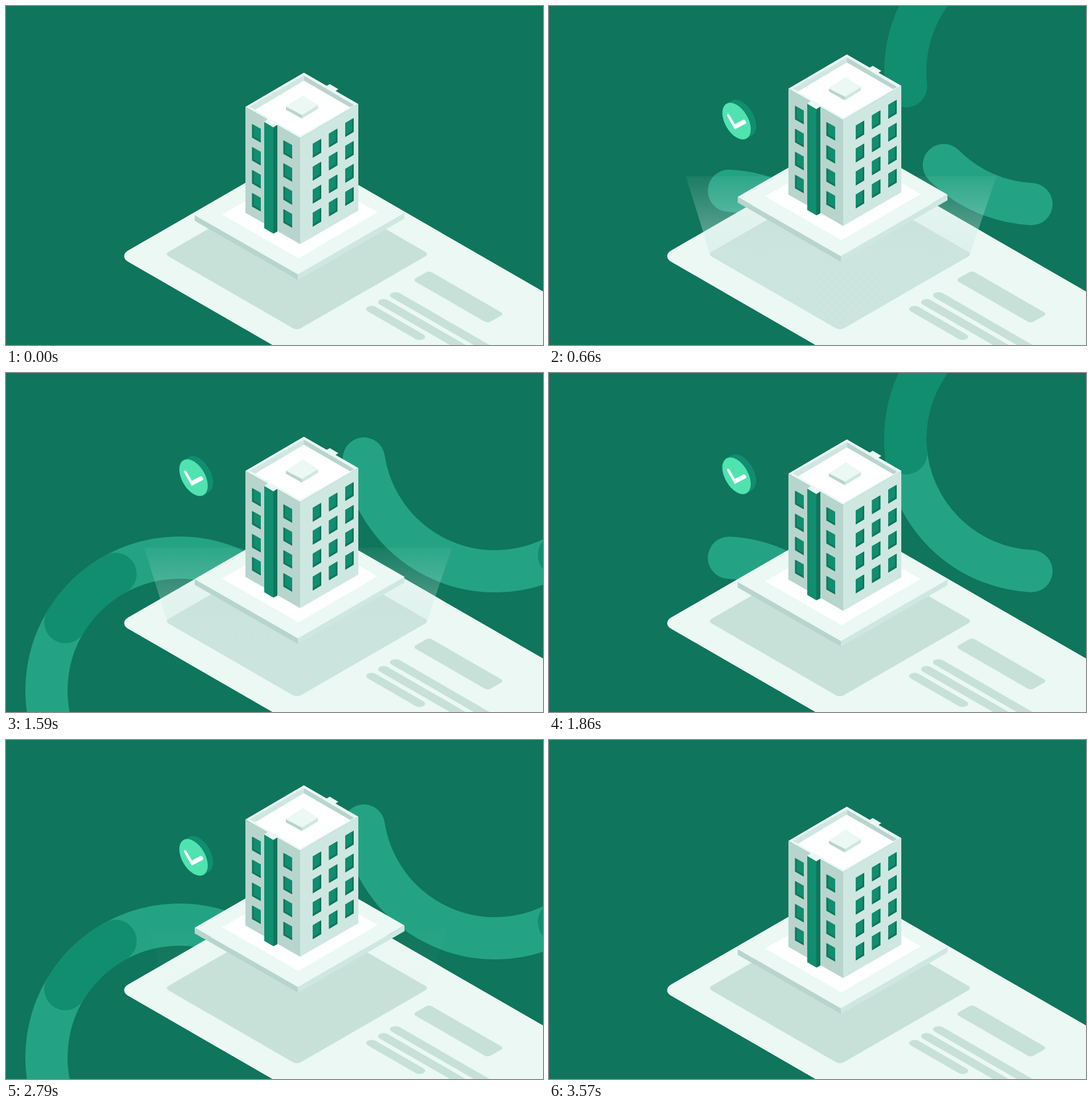
Write an HTML page that moves like this. It is 942 by 595 pixels and loops after 3600 ms.

```html
<!DOCTYPE html>
<html lang="en">
<head>
<meta charset="utf-8">
<title>Isometric building</title>
<style>
  html, body { margin: 0; width: 100%; height: 100%; overflow: hidden; background: #0f755c; }
  svg { display: block; width: 942px; height: 595px; }
  .pale { fill: #ebf8f4; }
  .mid { fill: #cfe7e1; }
  .shade { fill: #b8d5cd; }
  .rug { fill: #c7e1d9; }
  .white { fill: #fff; }
  .green { fill: #118d6f; }
  .dark { fill: #0f755c; }
  .ring { fill: none; stroke-width: 74; stroke-linecap: round; }
</style>
</head>
<body>
<svg viewBox="0 0 942 595">
  <defs>
    <linearGradient id="glow" gradientUnits="userSpaceOnUse" x1="0" x2="0" y1="267" y2="437">
      <stop offset="0" stop-color="#d0e9e3" stop-opacity=".08"/>
      <stop offset="1" stop-color="#d0e9e3" stop-opacity=".62"/>
    </linearGradient>
  </defs>

  <path id="lightRing" class="ring" stroke="#24a384"/>
  <path id="darkRing" class="ring" stroke="#118d6f"/>

  <!-- page, drawn in the ground plane -->
  <rect class="pale" width="900" height="368" rx="20" transform="matrix(.866 .5 -.866 .5 515.8 255)"/>
  <rect class="rug" width="268" height="268" rx="8" transform="matrix(.866 .5 -.866 .5 510.3 301.5)"/>
  <rect class="rug" width="152" height="33" rx="6" transform="matrix(.866 .5 -.866 .5 742 464.5)"/>
  <path d="M0 0H97M0-24.2H260M0-48.4H260" stroke="#c7e1d9" stroke-width="16" stroke-linecap="round"
        transform="matrix(.866 .5 -.866 .5 641.5 532)"/>

  <path id="beam" fill="url(#glow)"/>

  <g id="building">
    <path class="shade" d="M331 367L512 471V481L331 377Z"/>
    <path class="mid" d="M512 471L699 363V373L512 481Z"/>
    <path class="pale" d="M331 367L518 259 699 363 512 471Z"/>
    <path class="white" d="M379 366L518 286 652 362 513 443Z"/>
    <path class="pale" d="M561 141L568 137 583 146 575 151Z"/>
    <path class="shade" d="M420 177L516 232V418L420 363Z"/>
    <path class="mid" d="M516 232L618 172V359L516 418Z"/>
    <path class="pale" d="M522.5 117L618 172 516 232 420 177Z"/>
    <path class="white" d="M522.5 122L611 174 516 228 427 177Z"/>
    <path class="mid" d="M522.5 122L427 177 437 182 522.5 131Z"/>
    <path class="shade" d="M522.5 122L611 174 604 178 522.5 131Z"/>
    <path class="shade" d="M491 176.5L519 191V197.500L491 182Z"/>
    <path class="mid" d="M519 191L547 174V180.500L519 197.500Z"/>
    <path class="pale" d="M520.5 157L547 174 519 191 491 176.500Z"/>
    <path class="green" d="M453 203L469 212V399.500L453 390Z"/>
    <path class="dark" d="M469 212L476 208.500V396L469 399.500Z"/>
    <path class="pale" d="M453 203.500L460 198 476 208.500 469 213Z"/>
    <path id="frames" class="dark"/>
    <path id="panes" class="green"/>
  </g>

  <g id="badge">
    <path d="M0 0L11-11" stroke="#118d6f" stroke-width="57.6" stroke-linecap="round"/>
    <circle r="28.8" fill="#50e3b0"/>
    <path d="M-16.200-.9L-3.500 11.700 16.200-7.100" fill="none" stroke="#fff" stroke-width="6.500" stroke-linecap="round"/>
  </g>
</svg>
<script>
  const $ = id => document.getElementById(id);
  const clamp = (v, lo, hi) => Math.min(hi, Math.max(lo, v));
  const smooth = x => { x = clamp(x, 0, 1); return x * x * (3 - 2 * x); };
  const pingPong = (t, period) => 1 - Math.abs(2 * (t % period) / period - 1);

  // Windows: dark recess with a brighter pane inset
  let frames = '', panes = '';
  for (let row = 0; row < 4; row++) {
    const drop = row * 40.3;
    for (const [x, y] of [[431.500, 207], [486.500, 235.500]]) {
      frames += `M${x} ${y + drop}l15.500 8.800v24l-15.500-8.800z`;
      panes += `M${x + 3} ${y + drop + 1.700}l12.500 7.100v20.500l-12.500-7.100z`;
    }
    for (const [x, y] of [[538, 242], [566.500, 224], [595, 205.500]]) {
      frames += `M${x} ${y + drop}l15-9v24.500l-15 9z`;
      panes += `M${x} ${y + drop}l12-7.200v20.500l-12 7.200z`;
    }
  }
  $('frames').setAttribute('d', frames);
  $('panes').setAttribute('d', panes);

  function arc(cx, cy, from, to) {
    const at = deg => {
      const a = deg * Math.PI / 180;
      return `${cx + 233 * Math.cos(a)} ${cy + 233 * Math.sin(a)}`;
    };
    return `M${at(from)}A233 233 0 ${to - from > 180 ? 1 : 0} 1 ${at(to)}`;
  }

  // Both circles run in step, half a turn apart
  function drawRing(id, tail, head) {
    const from = clamp(tail, -60, 260), to = clamp(head, -60, 260);
    $(id).setAttribute('d', to > from ? arc(858, 115, from, to) + arc(304, 557, from + 180, to + 180) : '');
  }

  const tailAt = u => 30.4 + .506 * u + .000083 * u * Math.abs(u);
  const headAt = u => 60.7 + .616 * u;

  function draw(t) {
    const lift = smooth(pingPong(t, 1800));
    $('building').setAttribute('transform', `translate(0 ${-38.7 * lift})`);
    $('badge').setAttribute('transform', `matrix(.866 .5 0 1 329 ${180 + 26.700 * lift})`);
    $('badge').setAttribute('opacity', smooth((t - 300) / 200) * (1 - smooth((t - 3270) / 200)));

    const phase = t % 1200;
    drawRing('darkRing', tailAt(phase - 390), headAt(phase - 390));
    // The first sweep is a short dash, the later ones are long
    drawRing('lightRing', tailAt(phase - 540), t < 1200 ? headAt(phase - 540) : 170 + 1.33 * (phase - 390));

    const grow = pingPong(t, 900);
    const top = 339 - 73 * smooth(grow), rise = 437 - top;
    $('beam').setAttribute('d', `M283 437L${283 - .311 * rise} ${top}H${738 + .34 * rise}L738 437 521 564Q510.500 570 500 564Z`);
    $('beam').setAttribute('opacity', smooth((grow - .1) / .6));
    $('glow').setAttribute('y1', top);
  }

  const start = performance.now();
  function tick() {
    draw((performance.now() - start) % 3600);
    requestAnimationFrame(tick);
  }
  tick();
</script>
</body>
</html>
```
